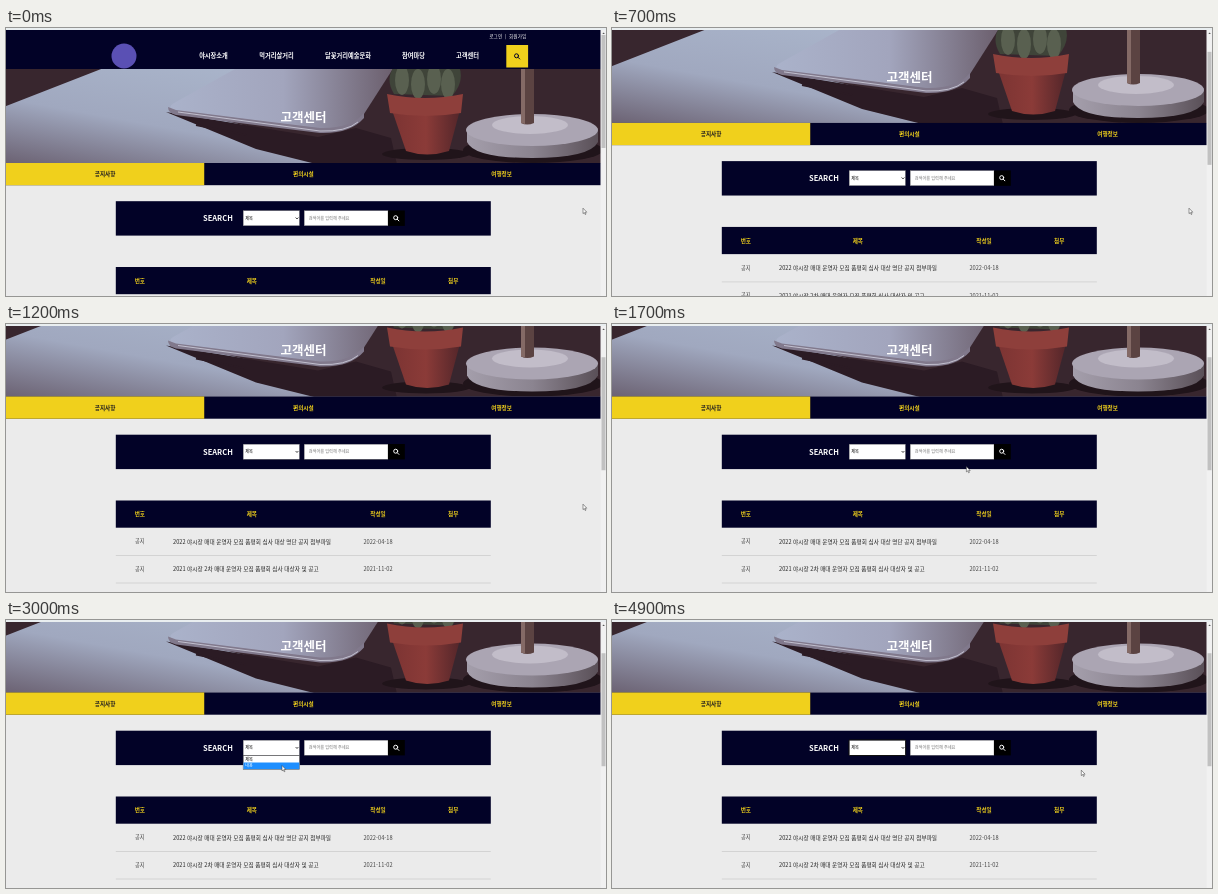
An HTML page that plays this animation: 600x268 px, repeating every 5 s.

```html
<!DOCTYPE html>
<html lang="ko">
<head>
<meta charset="utf-8">
<title>고객센터</title>
<style>
html, body { margin: 0; width: 100%; height: 100%; overflow: hidden; background: #ebebeb; }
svg { display: block; width: 100%; height: 100%; }
text { font-family: "Noto Sans CJK KR", "Noto Sans CJK", "Noto Sans CJK JP", "Noto Sans", sans-serif; }
</style>
</head>
<body>
<svg id="stage" viewBox="0 0 600 268" preserveAspectRatio="none" xmlns="http://www.w3.org/2000/svg"></svg>
<script>
const LOOP = 5000, STEP = 100;
const NAVY = '#020227', GOLD = '#f0d01c', BLUE = '#1e8fff';
const WIDTH = 594.7, LEFT = 109.8;

const rect = (x, y, w, h, fill, more = '') =>
  `<rect x="${x}" y="${y}" width="${w}" height="${h}" fill="${fill}" ${more}/>`;

const path = (d, fill, more = '') => `<path d="${d}" fill="${fill}" ${more}/>`;

const oval = (cx, cy, rx, ry, fill) =>
  `<ellipse cx="${cx}" cy="${cy}" rx="${rx}" ry="${ry}" fill="${fill}"/>`;

const fade = (id, dir, ...colors) => `<linearGradient id="${id}" ${dir}>` +
  colors.map((c, i) => `<stop offset="${i / (colors.length - 1)}" stop-color="${c}"/>`).join('') +
  '</linearGradient>';

// y is the middle of the line; the inner scale keeps tiny sizes exact
const label = (str, x, y, size, fill, weight = 400, anchor = 'start', id = '') =>
  `<text ${id && `id="${id}"`} transform="translate(${x} ${y + size * 0.37}) scale(.1)"
    font-size="${size * 10}" font-weight="${weight}" fill="${fill}" text-anchor="${anchor}">${str}</text>`;

const mid = (str, x, y, size, fill, weight = 700) => label(str, x, y, size, fill, weight, 'middle');

const glass = (x, y, color) =>
  `<g fill="none" stroke="${color}" stroke-width="1" stroke-linecap="round">
    <circle cx="${x - 0.5}" cy="${y - 0.5}" r="2"/><path d="M${x + 1.1} ${y + 1.1}l1.6 1.6"/></g>`;

function photo() {
  return `<g clip-path="url(#banner)"><g filter="url(#soft)">
    ${rect(-5, 36, 605, 105, '#38262e')}
    ${path('M-5 80L108 36H250L165 80 300 112 345 141H-5Z', 'url(#desk)')}
    ${path('M160 84L312 109 350 100 385 110 392 141H330L250 121Z', '#2b1b24')}
    ${path('M238 36H390L358 86Q344 102 314 101L170 83Q160 80 168 75Z', 'url(#lid)')}
    ${path('M162 79L170 82 314 100Q344 101 358 85L358 90Q344 106 314 105L170 87Q162 85 162 79Z', '#81798c')}
    ${path('M172 84L314 103Q340 104 352 94', 'none', 'stroke="#c9c8d6" stroke-width=".9"')}
    ${path('M190 97L240 107', 'none', 'stroke="#2b1b24" stroke-width="2"')}
    ${oval(420, 126, 44, 6, '#20141a')}
    ${path('M388 66Q378 50 390 36H452Q460 52 446 68Z', '#3f4439')}
    ${[[396, 52], [412, 56], [428, 51], [442, 56]].map(p => oval(...p, 7, 15, '#596050')).join('')}
    ${path('M386 82H454L443 123Q421 130 400 123Z', 'url(#clay)')}
    ${path('M381 66Q419 74 457 66L455 85Q420 91 384 85Z', '#8e3f3b')}
    ${oval(527, 122, 70, 13, '#20141a')}
    ${path('M461 100V114Q468 130 526 130T592 114V100Z', 'url(#base)')}
    ${oval(526, 102, 66, 16, '#aba5b3')}
    ${oval(524, 97, 38, 9, '#c2bdc9')}
    ${path('M515 36H528V95Q521 98 515 95Z', '#5b4342')}
    ${path('M515 36H519V96L515 95Z', '#846a66')}
  </g></g>`;
}

function header() {
  const nav = [['야시장소개', 207.5], ['먹거리살거리', 270.5], ['달꽃거리예술문화', 342],
    ['참여마당', 407.5], ['고객센터', 461.5]];
  return rect(0, 2, WIDTH, 39.2, NAVY) +
    '<circle cx="118" cy="28" r="12.5" fill="#5a50b4"/>' +
    label('로그인', 483.3, 8.6, 4.69, '#fff', 500) + label('|', 499, 8.4, 4.69, '#fff') +
    label('회원가입', 503, 8.6, 4.69, '#fff', 500) +
    nav.map(([s, x]) => mid(s, x, 28, 6.25, '#fff')).join('') +
    rect(500.3, 17, 21.8, 22.5, GOLD) + glass(511, 28.3, NAVY);
}

function tabs() {
  return rect(0, 135, WIDTH, 22.2, NAVY) + rect(0, 135, WIDTH / 3, 22.2, GOLD) +
    ['공지사항', '편의시설', '여행정보'].map((s, i) =>
      mid(s, WIDTH * (i + 0.5) / 3, 146.4, 5.63, i ? GOLD : '#1c1a20')).join('');
}

function search() {
  return rect(LEFT, 173.2, 375, 34.4, NAVY) +
    label('SEARCH', 197, 190.4, 7.5, '#fff', 700) +
    rect(237.2, 182.7, 56.2, 15, '#fff', 'stroke="#767676" stroke-width=".4"') +
    label('제목', 239.2, 190.3, 4.17, '#000', 400, 'start', 'choice') +
    '<path d="M289.6 189.5l1.4 1.5 1.4-1.5" fill="none" stroke="#000" stroke-width=".7"/>' +
    rect(298.2, 182.7, 83.8, 15, '#fff', 'stroke="#767676" stroke-width=".4"') +
    label('검색어를 입력해 주세요', 302.8, 190.3, 4.17, '#757575') +
    rect(382, 182.5, 16.8, 15.4, '#000') + glass(390.2, 190.2, '#fff') +
    rect(236.9, 182.4, 56.8, 15.6, 'none', 'id="ring" rx=".8" stroke="#101010" stroke-width="1"');
}

function table() {
  const heads = [['번호', 133.8], ['제목', 245.8], ['작성일', 372], ['첨부', 447.2]];
  const rows = [
    ['2022 야시장 매대 운영자 모집 품평회 심사 대상 명단 공지 첨부파일', '2022-04-18'],
    ['2021 야시장 2차 매대 운영자 모집 품평회 심사 대상자 및 공고', '2021-11-02']];
  return rect(LEFT, 239, 375, 27.2, NAVY) +
    heads.map(([s, x]) => mid(s, x, 252.7, 5.63, GOLD)).join('') +
    rows.map(([s, date], i) => {
      const y = 280.2 + 27.5 * i;
      return mid('공지', 133.8, y - 0.4, 5.2, '#444', 400) +
        label(s, 167, y, 5.65, '#222', 500) + mid(date, 372, y, 5.7, '#444', 400) +
        rect(LEFT, y + 13.5, 375, 0.6, '#c4c4c4');
    }).join('');
}

function menu() {
  return '<g id="menu">' + rect(237.2, 198, 56.4, 13.8, '#fff', 'stroke="#555" stroke-width=".6"') +
    ['제목', '내용'].map((s, i) =>
      rect(237.5, 198.3 + 6.7 * i, 55.8, 6.6, BLUE, `id="bar${i}"`) +
      label(s, 239.2, 201.5 + 6.7 * i, 4.17, '#000', 400, 'start', 'opt' + i)).join('') + '</g>';
}

const stage = document.getElementById('stage');
stage.innerHTML = '<defs>' +
  fade('desk', 'x1="0" y1="1" x2=".6" y2="0"', '#665b6b', '#a0a8bf', '#a9b4ca') +
  fade('lid', '', '#aab2ca', '#a2a5bd', '#6a5d6b') +
  fade('clay', '', '#7c3433', '#8b3b38', '#54262a') +
  fade('base', '', '#a49eab', '#8b8490', '#5a5058') +
  `<filter id="soft"><feGaussianBlur stdDeviation=".7"/></filter>
  <clipPath id="banner"><rect x="0" y="41" width="${WIDTH}" height="94.2"/></clipPath></defs>` +
  rect(0, 0, 600, 268, '#ebebeb') +
  '<g id="page">' + header() + photo() + mid('고객센터', 297.5, 89, 12.5, '#fff') +
  tabs() + search() + table() + menu() + '</g>' +
  rect(0, 0, 600, 2, '#e9eef0') + rect(WIDTH, 2, 5.3, 266, '#f1f1f1') +
  path('M596.4 6l1.2-1.5 1.2 1.5Z', '#555') +
  rect(595.5, 7, 4, 113, '#c1c1c1', 'id="thumb"') +
  path('M0 0V5.4L1.3 4.3 2.2 6.3 3 5.9 2.2 4H3.8Z', '#fff',
    'id="cursor" stroke="#333" stroke-width=".5" stroke-linejoin="round"');

const $ = id => document.getElementById(id);

// [ms, values...], eased between neighbours
const SCROLL = [[500, 0], [836, 62.5]];
const POINTER = [[1300, 577, 180.2], [1900, 276.5, 129.3], [2400, 276.5, 129.3], [2800, 276, 145.5],
  [3100, 276, 145.5], [3400, 276.5, 130], [3600, 276.5, 130], [3900, 277, 137],
  [4200, 277, 137], [4700, 469.3, 150.2]];
// [ms, menu open, chosen option]
const CLICKS = [[0, false, 0], [2000, true, 0], [3100, false, 1], [3600, true, 1], [4200, false, 0]];
const OPTIONS = ['제목', '내용'];

function at(track, t) {
  const i = track.findIndex(k => k[0] > t);
  if (i === 0) return track[0].slice(1);
  if (i < 0) return track[track.length - 1].slice(1);
  const [a, b] = [track[i - 1], track[i]];
  const p = (t - a[0]) / (b[0] - a[0]), e = p * p * (3 - 2 * p);
  return a.slice(1).map((v, n) => v + (b[n + 1] - v) * e);
}

function render(t) {
  const [scroll] = at(SCROLL, t);
  const [x, y] = at(POINTER, t);
  const [since, open, chosen] = CLICKS.filter(k => k[0] <= t).pop();
  const over = y + scroll > 198 ? (y + scroll < 205 ? 0 : 1) : chosen;

  $('page').setAttribute('transform', `translate(0 ${-scroll})`);
  $('thumb').setAttribute('y', 7 + scroll * 0.42);
  $('cursor').setAttribute('transform', `translate(${x} ${y})`);
  $('choice').textContent = OPTIONS[chosen];
  $('menu').setAttribute('visibility', open ? 'visible' : 'hidden');
  $('ring').setAttribute('visibility', since > 0 && !open ? 'visible' : 'hidden');
  OPTIONS.forEach((_, i) => {
    $('bar' + i).setAttribute('opacity', i === over ? 1 : 0);
    $('opt' + i).setAttribute('fill', i === over ? '#fff' : '#000');
  });
}

const start = performance.now();
function tick() {
  const t = (performance.now() - start) % LOOP;
  render(Math.floor(t / STEP) * STEP);
  requestAnimationFrame(tick);
}
tick();
</script>
</body>
</html>
```
